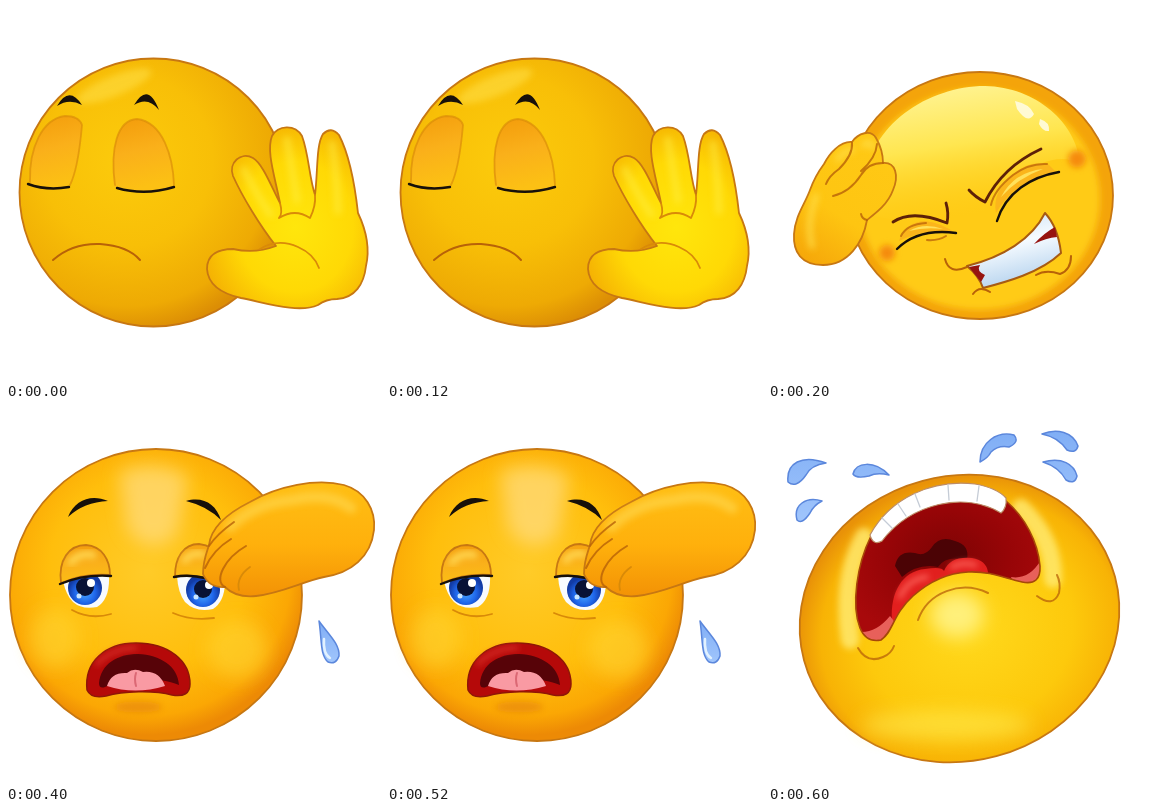
Animation of 375x375 px, one loop 800 ms. Source, as an HTML page:

```html
<!DOCTYPE html>
<html lang="en">
<head>
<meta charset="utf-8">
<title>Worn-out smiley</title>
<style>
html, body { margin: 0; width: 100%; height: 100%; overflow: hidden; background: #fff; }
svg { display: block; width: 100vw; height: 100vh; }
path, ellipse { stroke-linecap: round; stroke-linejoin: round; }
.pose { visibility: hidden; }
.line { fill: none; stroke: #b86208; stroke-width: 2; }
.crease { fill: none; stroke: #d98a08; stroke-width: 1.8; }
.ink { fill: #17100a; }
.lash { fill: none; stroke: #17100a; stroke-width: 2.4; }
.brow { fill: none; stroke: #5d2108; stroke-width: 2.8; }
.rim { stroke: #c77712; stroke-width: 1.8; }
.soft { filter: url(#blur); }
.haze { filter: url(#wide); }
.tear { fill: url(#water); stroke: #5b87dc; stroke-width: 1.5; }
</style>
</head>
<body>
<svg viewBox="0 0 375 375">
<defs>
  <filter id="blur" x="-50%" y="-50%" width="200%" height="200%"><feGaussianBlur stdDeviation="3"/></filter>
  <filter id="wide" x="-50%" y="-50%" width="200%" height="200%"><feGaussianBlur stdDeviation="9"/></filter>
  <radialGradient id="calm" cx=".4" cy=".38" r=".64">
    <stop offset="0" stop-color="#fccb0c"/><stop offset=".5" stop-color="#f8bf07"/>
    <stop offset=".85" stop-color="#eeaa04"/><stop offset="1" stop-color="#dc8e05"/>
  </radialGradient>
  <radialGradient id="warm" cx=".47" cy=".42" r=".56">
    <stop offset="0" stop-color="#ffcb28"/><stop offset=".6" stop-color="#ffbe0c"/>
    <stop offset=".88" stop-color="#fba704"/><stop offset="1" stop-color="#ed8a05"/>
  </radialGradient>
  <radialGradient id="bright" cx=".52" cy=".55" r=".54">
    <stop offset="0" stop-color="#ffd91c"/><stop offset=".6" stop-color="#fdc90c"/>
    <stop offset=".86" stop-color="#f8b305"/><stop offset="1" stop-color="#e99208"/>
  </radialGradient>
  <radialGradient id="palm" cx=".55" cy=".55" r=".6">
    <stop offset="0" stop-color="#ffe60c"/><stop offset=".6" stop-color="#ffd905"/><stop offset="1" stop-color="#f5b203"/>
  </radialGradient>
  <linearGradient id="cuff" x1=".7" x2=".2" y2="1">
    <stop offset="0" stop-color="#ffc915"/><stop offset=".6" stop-color="#fec511"/><stop offset="1" stop-color="#f6a80a"/>
  </linearGradient>
  <linearGradient id="lid" x2=".2" y2="1">
    <stop offset="0" stop-color="#f39c0b"/><stop offset=".5" stop-color="#fab01a"/><stop offset="1" stop-color="#fcc014"/>
  </linearGradient>
  <linearGradient id="glow" x2=".25" y2="1">
    <stop offset="0" stop-color="#fff6a0"/><stop offset=".5" stop-color="#ffe650"/><stop offset="1" stop-color="#ffd21c" stop-opacity="0"/>
  </linearGradient>
  <linearGradient id="sleeve" x2="0" y2="1">
    <stop offset="0" stop-color="#ffbf14"/><stop offset=".55" stop-color="#ffb00c"/><stop offset="1" stop-color="#f39205"/>
  </linearGradient>
  <linearGradient id="teeth" x2=".3" y2="1">
    <stop offset="0" stop-color="#c4dcf3"/><stop offset=".5" stop-color="#f6fbff"/><stop offset="1" stop-color="#b9d5ef"/>
  </linearGradient>
  <linearGradient id="water" x2="0" y2="1">
    <stop offset="0" stop-color="#80aef5"/><stop offset="1" stop-color="#a0c5fc"/>
  </linearGradient>
  <radialGradient id="throat" cx=".5" cy=".45" r=".6">
    <stop offset="0" stop-color="#7d0404"/><stop offset=".55" stop-color="#970507"/><stop offset="1" stop-color="#a8090b"/>
  </radialGradient>
  <radialGradient id="iris" cy=".65">
    <stop offset="0" stop-color="#45a4ff"/><stop offset=".6" stop-color="#1f66ea"/><stop offset="1" stop-color="#123ba6"/>
  </radialGradient>
  <clipPath id="eyeL"><path d="M57 172Q80 166 103 167Q104 190 91 198Q76 201 67 193Q60 186 57 172Z"/></clipPath>
  <clipPath id="eyeR"><path d="M171 167Q195 163 219 175Q218 193 207 200Q190 204 179 193Q172 184 171 167Z"/></clipPath>
  <clipPath id="shout"><path id="wail" d="M103 127C89 155 83 196 92 219Q98 234 113 231C126 222 124 206 145 187C162 172 180 164 200 163C224 162 238 170 254 173Q273 177 272 157C270 133 257 108 238 92C205 74 135 80 103 127Z"/></clipPath>
</defs>

<!-- Eyes shut, palm raised -->
<g class="pose">
  <circle class="rim" cx="147.500" cy="186.500" r="134" fill="url(#calm)"/>
  <ellipse class="soft" cx="108" cy="80" rx="40" ry="10" fill="#ffe04a" opacity=".55" transform="rotate(-22 108 80)"/>
  <path d="M24 179C22 142 36 113 59 110Q73 110 76 119C74 142 71 165 63 182Q42 186 24 179Z" fill="url(#lid)"/>
  <path d="M108 181C104 143 111 114 131 113C157 116 167 151 168 181Q138 190 108 181Z" fill="url(#lid)"/>
  <path class="crease" d="M24 176C23 142 36 113 59 110Q73 110 76 119C74 142 71 165 64 179M109 179C104 143 111 114 131 113C157 116 167 151 168 179" opacity=".65"/>
  <path class="lash" d="M22 178Q41 185 63 181M111 182Q139 190 168 181"/>
  <path class="ink" d="M51 100Q63 79 76 99Q63 92 51 100ZM128 99Q142 75 153 104Q142 90 128 99Z"/>
  <path class="line" d="M47 254Q66 237 94 238Q122 240 134 254" stroke-width="1.800"/>
  <path class="rim" d="M201 263C201 248 213 243 227 243Q249 248 270 240C254 220 236 190 227 170C222 157 235 145 247 152C257 158 265 180 274 197C269 171 260 145 266 130C272 119 289 118 296 130C303 149 303 171 309 189C312 165 310 139 317 128Q325 120 333 129C344 150 349 180 352 207C361 226 364 243 360 260C358 278 349 292 331 293Q320 293 312 299C292 308 257 296 235 292C213 287 202 278 201 263Z" fill="url(#palm)"/>
  <path class="soft" d="M238 164Q254 194 264 208M281 134Q287 170 291 194M326 138Q331 170 332 205" fill="none" stroke="#fff04a" stroke-width="7" opacity=".5"/>
  <path class="crease" d="M254 243Q272 232 292 241Q308 248 313 262M274 197Q277 208 273 212Q289 202 304 212Q310 200 309 189"/>
</g>

<!-- Gritted teeth, hand on temple -->
<g class="pose">
  <ellipse class="rim" cx="212" cy="189.500" rx="133" ry="123.500" fill="#f4a40a"/>
  <ellipse class="soft" cx="211" cy="193" rx="121" ry="111" fill="#ffcb13"/>
  <path d="M98 176C100 120 160 80 217 80C268 81 309 117 312 158C285 140 236 172 208 216Q150 220 106 210Q98 195 98 176Z" fill="url(#glow)"/>
  <path d="M247 95Q262 98 266 108Q260 119 249 103ZM272 113Q282 116 281 125Q275 126 271 118Z" fill="#fffce0" opacity=".9"/>
  <circle class="soft" cx="309" cy="153" r="9" fill="#f58a0c"/>
  <circle class="soft" cx="119" cy="247" r="8" fill="#f58a0c"/>
  <path d="M131 235Q137 216 157 215Q174 217 187 227Q154 223 131 235Z" fill="#fbb51b"/>
  <path d="M228 207Q224 187 243 170Q259 154 280 158L288 166Q246 175 228 207Z" fill="#fbb51b"/>
  <path d="M233 191Q246 166 275 163Q250 172 233 191ZM141 225Q156 216 175 223Q156 221 141 225Z" fill="#ffe15b"/>
  <path class="line" d="M223 199Q226 184 245 169Q261 157 279 158M133 230Q139 218 158 217M159 234Q170 235 178 230" opacity=".75"/>
  <path class="brow" d="M125 216Q144 203 179 217Q181 207 178 197M201 184Q207 191 217 196C229 172 247 155 273 143"/>
  <path class="lash" d="M129 243Q150 222 188 227M229 215C238 186 263 171 291 166" stroke-width="3"/>
  <path d="M199 260C235 251 264 233 277 207Q290 221 293 247C272 267 238 276 215 282Q211 270 199 260Z" fill="url(#teeth)" stroke="#a85b12" stroke-width="2"/>
  <path d="M266 238Q276 227 287 221L289 231Q278 232 266 238ZM201 261L212 259Q208 265 217 269L213 276Z" fill="#971410"/>
  <path class="line" d="M177 253Q181 269 199 261M205 288Q211 279 222 286M268 269Q278 263 292 268Q303 264 303 250"/>
  <path class="rim" d="M26 228C27 210 37 198 42 184Q47 170 56 158C61 148 72 135 84 136C90 127 103 123 108 132Q115 144 115 157C128 156 131 170 125 184C120 198 108 207 99 214C95 237 80 259 55 259C33 259 25 246 26 228Z" fill="url(#cuff)"/>
  <path class="soft" d="M48 190Q38 218 44 240M70 153Q76 144 84 144M96 139Q101 133 105 141" fill="none" stroke="#ffe04c" stroke-width="6" opacity=".7"/>
  <path class="line" d="M84 137Q85 149 71 163Q61 170 58 178M115 157Q100 157 93 169Q82 186 65 190M109 138Q108 152 93 165M99 214Q94 213 93 208" opacity=".8"/>
</g>

<!-- Exhausted, wiping the brow -->
<g class="pose">
  <ellipse class="rim" cx="150" cy="186" rx="146" ry="146" fill="url(#warm)"/>
  <path class="haze" d="M113 63Q150 48 182 67L171 125Q145 151 121 120Z" fill="#ffdd83" opacity=".7"/>
  <ellipse class="haze" cx="49" cy="229" rx="25" ry="30" fill="#ffd32e" opacity=".65"/>
  <ellipse class="haze" cx="231" cy="240" rx="30" ry="29" fill="#ffd32e" opacity=".65"/>
  <path class="ink" d="M62 108C69 90 86 85 102 92Q78 93 62 108ZM180 92C197 87 210 95 215 111Q201 97 180 92Z"/>
  <g clip-path="url(#eyeL)">
    <path d="M50 155H110V205H50Z" fill="#f8fbff"/>
    <circle cx="79" cy="179" r="17" fill="url(#iris)"/><circle cx="79" cy="178" r="9" fill="#081235"/>
    <circle cx="85" cy="174" r="4" fill="#fff"/><circle cx="73" cy="187" r="2.500" fill="#c9e6ff"/>
  </g>
  <g clip-path="url(#eyeR)">
    <path d="M165 155H225V207H165Z" fill="#f8fbff"/>
    <circle cx="197" cy="181" r="17" fill="url(#iris)"/><circle cx="197" cy="180" r="9" fill="#081235"/>
    <circle cx="203" cy="176" r="4" fill="#fff"/><circle cx="190" cy="188" r="2.500" fill="#c9e6ff"/>
  </g>
  <path class="rim" d="M55 174C52 151 63 136 80 136C96 137 104 151 104 166Q78 164 55 174ZM169 167C169 149 177 135 193 135C213 137 222 156 221 176Q195 164 169 167Z" fill="url(#lid)"/>
  <path class="soft" d="M65 153Q74 143 87 146M179 151Q185 143 196 145" fill="none" stroke="#ffd650" stroke-width="7"/>
  <path class="lash" d="M54 175Q78 165 105 167M168 168Q192 163 221 177"/>
  <path class="crease" d="M66 201Q84 211 105 205M167 204Q185 212 208 209"/>
  <path d="M81 281C78 253 99 234 130 234C163 234 184 252 184 275Q184 289 166 286C148 281 117 282 100 287Q85 290 81 281Z" fill="#b50909" stroke="#8f1606" stroke-width="1.500"/>
  <path d="M93 274C95 255 111 245 132 245C154 246 172 257 173 276C148 266 117 270 99 278Q93 280 93 274Z" fill="#570308"/>
  <path d="M101 277Q105 263 121 264Q128 258 137 263Q153 261 159 277Q129 286 101 277Z" fill="#f99aa3"/>
  <path d="M130 264Q128 270 130 277" fill="none" stroke="#db6874" stroke-width="2"/>
  <path class="soft" d="M91 255Q106 239 130 239" fill="none" stroke="#e73c32" stroke-width="3"/>
  <ellipse class="soft" cx="132" cy="298" rx="24" ry="6" fill="#e98a08" opacity=".75"/>
  <path class="rim" d="M197 165C197 151 201 143 203 136C205 118 222 104 244 93C272 77 310 69 338 76C359 82 370 101 368 121C365 148 345 164 318 168C295 173 276 184 250 187Q230 189 219 178Q203 179 197 165Z" fill="url(#sleeve)"/>
  <path class="soft" d="M224 118Q249 94 286 91Q323 82 345 99" fill="none" stroke="#ffd447" stroke-width="11" opacity=".7"/>
  <path class="line" d="M203 137Q211 125 228 113M199 159Q207 141 225 130M219 178C207 172 219 149 240 137" opacity=".8"/>
  <path class="crease" d="M233 181Q230 168 244 158"/>
  <path class="tear" d="M313 212C322 225 334 235 333 247Q330 256 322 253C314 246 316 232 313 212Z"/>
  <path d="M318 230Q317 245 324 249" fill="none" stroke="#e1f1ff" stroke-width="2.500"/>
</g>

<!-- Wailing -->
<g class="pose">
  <ellipse class="rim" cx="191.500" cy="209.500" rx="161" ry="142.500" transform="rotate(-15 191.500 209.500)" fill="url(#bright)"/>
  <path class="soft" d="M96 128Q73 170 82 231M253 99Q286 131 285 170" fill="none" stroke="#ffea72" stroke-width="18" opacity=".8"/>
  <ellipse class="haze" cx="178" cy="316" rx="85" ry="15" fill="#ffe94e" opacity=".6"/>
  <use href="#wail" fill="url(#throat)"/>
  <g clip-path="url(#shout)">
    <path d="M127 157Q130 141 147 144Q157 148 164 138Q172 126 187 132Q202 136 199 151Q178 146 170 158Q150 154 134 168Z" fill="#4b0305"/>
    <path d="M124 211C122 184 134 162 157 160Q174 157 176 162Q182 147 204 149Q218 151 220 163L213 180Q168 173 139 216Z" fill="#e21f1e"/>
    <path class="soft" d="M132 188Q140 170 159 168M184 158Q195 152 207 156" fill="none" stroke="#ff6a60" stroke-width="4"/>
    <path d="M92 223Q108 224 122 207L132 220L108 238ZM243 168Q261 171 273 151L280 180L250 187Z" fill="#e8605a"/>
  </g>
  <use href="#wail" fill="none" stroke="#a64808" stroke-width="1.600"/>
  <path d="M102 126C122 89 164 70 207 75Q229 79 238 89Q239 99 233 104C197 82 143 94 114 132Q105 137 102 126Z" fill="#fff" stroke="#bd8c66" stroke-width="1.200"/>
  <path d="M114 109L124 119M130 95L138 107M147 85L152 98M180 76L181 91M211 77L209 92" fill="none" stroke="#c5ccd6" stroke-width="1.300"/>
  <ellipse class="haze" cx="189" cy="206" rx="27" ry="23" fill="#fff07a"/>
  <path class="line" d="M150 211C160 183 193 171 220 184M90 239Q99 255 115 248Q123 245 126 237M269 187Q285 199 291 184Q293 174 289 166" stroke-width="2.400" opacity=".75"/>
  <path class="tear" d="M20 73C18 54 34 45 58 54Q43 56 38 66Q28 80 20 73ZM29 111C25 96 38 87 54 92Q46 96 42 104Q34 116 29 111ZM85 65C88 53 106 51 121 66Q109 63 101 67Q88 70 85 65ZM212 53C212 33 229 22 246 26Q252 33 241 38Q230 36 223 43Q220 49 212 53ZM274 25C289 19 305 23 310 37Q308 45 299 41Q290 28 274 25ZM275 53C294 48 306 55 309 67Q307 76 298 71Q291 58 275 53Z"/>
</g>
</svg>
<script>
const poses = document.querySelectorAll('.pose');
const start = performance.now();

function draw() {
  const step = Math.floor((performance.now() - start) % 800 / 200);
  poses.forEach((pose, i) => pose.style.visibility = i === step ? 'visible' : 'hidden');
  requestAnimationFrame(draw);
}
draw();
</script>
</body>
</html>
```
